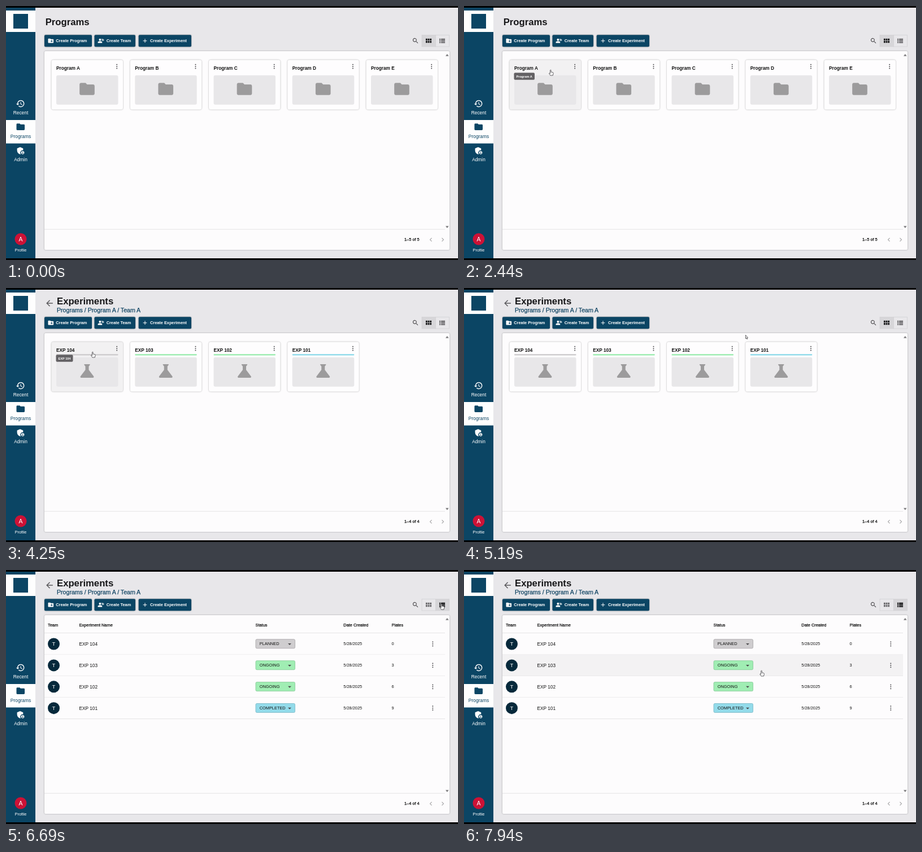
Recreate the animation shown at these times as an HTML page. Size 800x450 px, loop 8000 ms.

```html
<!DOCTYPE html>
<html lang="en">
<head>
<meta charset="utf-8">
<title>Programs</title>
<style>
  html, body { margin: 0; width: 100%; height: 100%; overflow: hidden; background: #000; }
  svg { display: block; width: 800px; height: 450px; }
  text { font: 8.25px "Liberation Sans", Arial, sans-serif; fill: #111; }
  .b { font-weight: 700; }
  .mid { stroke: currentColor; stroke-width: .25px; }
  .mid, .link { color: #111; }
  .title { font-size: 16.7px; font-weight: 700; fill: #171719; }
  .crumb { font-size: 10.6px; fill: #0d4261; color: #0d4261; }
  .btn { font-size: 7.35px; font-weight: 700; fill: #fff; }
  .nav { font-size: 8.4px; fill: #fff; text-anchor: middle; }
  .small { font-size: 7.4px; }
  .tip { font-size: 5.6px; font-weight: 700; fill: #fff; }
  .card { fill: #fefdfe; filter: drop-shadow(0 .8px .8px #0005); }
  .card.over { fill: #f2f1f2; }
  .row { fill: #fdfcfd; }
  .row.over { fill: #f3f2f3; }
  .line { stroke: #e4e3e5; stroke-width: 1; }
</style>
</head>
<body>
<svg id="stage" viewBox="0 0 800 450"></svg>
<script>
const NAVY = '#0b4564', GREY = '#9c9b9c', DARK = '#4d4c4f';
const icons = {
  folder: 'M10 4H4c-1.1 0-2 .9-2 2v12c0 1.1.9 2 2 2h16c1.1 0 2-.9 2-2V8c0-1.1-.9-2-2-2h-8l-2-2z',
  folderAdd: 'M20 6h-8l-2-2H4c-1.1 0-2 .9-2 2v12c0 1.1.9 2 2 2h16c1.1 0 2-.9 2-2V8c0-1.1-.9-2-2-2zm-1 8h-3v3h-2v-3h-3v-2h3V9h2v3h3v2z',
  personAdd: 'M9 4a4 4 0 1 1 0 8a4 4 0 1 1 0-8zM1 20v-3c0-2.5 5-4 8-4s8 1.500 8 4v3zM14 4a4 4 0 0 1 0 8c2-2 2-6 0-8zM19 8V5h2v3h3v2h-3v3h-2v-3h-3V8z',
  plus: 'M19 13h-6v6h-2v-6H5v-2h6V5h2v6h6z',
  history: 'M13 3c-4.970 0-9 4.030-9 9H1l4 4 4-4H6c0-3.870 3.130-7 7-7s7 3.130 7 7-3.130 7-7 7c-1.930 0-3.680-.8-4.940-2.060l-1.420 1.420A9 9 0 1 0 13 3zm-1 5v5l4.280 2.540.72-1.210-3.500-2.080V8z',
  shield: 'M17 11c.34 0 .67.04 1 .09V6.270L10.500 3 3 6.270v4.910c0 4.540 3.200 8.790 7.500 9.820.55-.13 1.080-.32 1.600-.55A6 6 0 0 1 17 11zM17 13a4 4 0 1 0 0 8a4 4 0 1 0 0-8zm0 1.400a1.100 1.100 0 1 1 0 2.200a1.100 1.100 0 1 1 0-2.200zm0 5.350c-.93 0-1.740-.46-2.240-1.170.05-.72 1.510-1.080 2.240-1.080s2.190.36 2.240 1.080c-.5.71-1.310 1.170-2.240 1.170z',
  groups: 'M12 12.750c1.630 0 3.070.39 4.240.9A3 3 0 0 1 18 16.400V18H6v-1.600a3 3 0 0 1 1.760-2.750c1.170-.5 2.610-.9 4.240-.9zM12 6a3 3 0 1 1 0 6a3 3 0 1 1 0-6zM4 9a2 2 0 1 1 0 4a2 2 0 1 1 0-4zM20 9a2 2 0 1 1 0 4a2 2 0 1 1 0-4zM5.100 14.100a7 7 0 0 0-3.900.5A2 2 0 0 0 0 16.400V18h4.500v-1.600c0-.8.2-1.600.6-2.300zM18.900 14.100a7 7 0 0 1 3.900.5A2 2 0 0 1 24 16.400V18h-4.500v-1.600c0-.8-.2-1.600-.6-2.300z',
  flask: 'M19.800 18.400L14 10.670V6.500l1.350-1.690c.26-.33.03-.81-.39-.81H9.040c-.42 0-.65.48-.39.81L10 6.500v4.170L4.200 18.400c-.49.66-.02 1.600.8 1.600h14c.82 0 1.290-.94.8-1.600z',
  search: 'M15.500 14h-.8l-.3-.3a6.500 6.500 0 1 0-.7.700l.3.300v.8l5 5 1.500-1.500zm-6 0a4.500 4.500 0 1 1 0-9a4.500 4.500 0 1 1 0 9z',
  back: 'M20 11H7.830l5.590-5.590L12 4l-8 8 8 8 1.410-1.410L7.830 13H20z',
  grid: 'M3 5h5v6H3zM9.500 5h5v6h-5zM16 5h5v6h-5zM3 12.500h5v6H3zM9.500 12.500h5v6h-5zM16 12.500h5v6h-5z',
  list: 'M3 5h4v4H3zM8.500 5H21v4H8.500zM3 10h4v4H3zM8.500 10H21v4H8.500zM3 15h4v4H3zM8.500 15H21v4H8.500z'
};

// Drawing helpers
const icon = (name, cx, cy, size, fill, id = '') =>
  `<path ${id && `id="${id}"`} d="${icons[name]}" fill="${fill}" fill-rule="evenodd" transform="translate(${cx - size / 2} ${cy - size / 2}) scale(${size / 24})"/>`;
const text = (x, y, s, cls = '') => `<text x="${x}" y="${y}" class="${cls}">${s}</text>`;
const rect = (x, y, w, h, fill, rx = 0, extra = '') =>
  `<rect x="${x}" y="${y}" width="${w}" height="${h}" fill="${fill}" rx="${rx}" ${extra}/>`;
const hline = (x1, x2, y) => `<path class="line" d="M${x1} ${y}H${x2}"/>`;
const dots = (x, y) => [-3.4, 0, 3.4].map(d => `<circle cx="${x}" cy="${y + d}" r="1" fill="${DARK}"/>`).join('');
const chevron = (x, dir) => `<path d="M${x - dir * 1.5} 411l${dir * 3} 3l${-dir * 3} 3" fill="none" stroke="#aaa9ab" stroke-width="1.1"/>`;

const PITCH = 139.25;
function card(name, i, symbol, size, strip) {
  const x = 80.5 + i * PITCH;
  return `<rect class="card" x="${x}" y="95.500" width="126.500" height="88" rx="3.500"/>`
    + text(x + 8.5, 113, name, 'b') + dots(x + 115.7, 107.2)
    + (strip ? rect(x + 8.5, 117, 109.5, 2.6, strip, 1) : '')
    + rect(x + 8.5, 122.7, 109.5, 52, '#e8e7e9', 3)
    + icon(symbol, x + 63, 147, size, GREY);
}
function tooltip(id, label, w) {
  return `<g id="${id}">${rect(88.5, 118.3, w, 12.4, '#636164', 2)}${text(92.5, 126.6, label, 'tip')}</g>`;
}
const header = (title, crumbs) => icon('back', 77, 27, 17.5, '#5a595c')
  + text(90, 29, title, 'title') + text(90, 43, crumbs, 'crumb mid');
const count = n => text(705, 416.3, `1–${n} of ${n}`, 'small mid');

function row(name, i, status, fill, edge, plates) {
  const y = 131 + 38 * i - i * .1;
  return `<rect class="row" x="68" y="${y - 18.8}" width="709" height="37.500"/>`
    + hline(68, 777, y + 19)
    + `<circle cx="84.500" cy="${y}" r="10.500" fill="#06293b"/>`
    + `<text x="84.500" y="${y + 3.4}" style="font-size:9.500px;fill:#fff;text-anchor:middle">T</text>`
    + text(129.6, y + 3, name)
    + rect(442, y - 8.2, 69.5, 16, fill, 2, `stroke="${edge}" stroke-width=".8"`)
    + text(448.7, y + 2.2, status, 'small')
    + `<path d="M499 ${y - 1}h6l-3 3z" fill="${DARK}"/>`
    + text(597.3, y + 2.2, '5/28/2025', 'small') + text(682.6, y + 2.2, plates, 'small')
    + dots(755.3, y);
}

const letters = ['A', 'B', 'C', 'D', 'E'];
const gray = '#cfcdcf', green = '#a0edb3', blue = '#93dbea';
const strips = [gray, green, green, blue];
const names = ['EXP 104', 'EXP 103', 'EXP 102', 'EXP 101'];
const path = 'Programs / Program A';

const scenes = [
  text(69.7, 34, 'Programs', 'title') + count(5)
    + letters.map((l, i) => card('Program ' + l, i, 'folder', 32)).join(''),
  header('Teams', path) + count(2)
    + ['Team A', 'Team B'].map((n, i) => card(n, i, 'groups', 31)).join(''),
  header('Experiments', path + ' / Team A') + count(4)
    + names.map((n, i) => card(n, i, 'flask', 36, strips[i])).join(''),
  header('Experiments', path + ' / Team A') + count(4)
    + [[74, 'Team'], [129.6, 'Experiment Name'], [441.5, 'Status'], [597.3, 'Date Created'], [682.6, 'Plates']]
      .map(([x, s]) => text(x, 99.8, s, 'small mid')).join('') + hline(68, 777, 111.6)
    + row(names[0], 0, 'PLANNED', gray, '#a5a3a5', 0) + row(names[1], 1, 'ONGOING', green, '#83c795', 3)
    + row(names[2], 2, 'ONGOING', green, '#83c795', 6) + row(names[3], 3, 'COMPLETED', blue, '#78b5c4', 9)
];

const button = (x, w, name, label, tx) =>
  rect(x, 51.3, w, 21, NAVY, 2, 'style="filter:drop-shadow(0 .8px .8px #0006)"')
  + icon(name, x + 11.3, 61.7, 11.5, '#fff') + text(tx, 64.2, label, 'btn');

stage.innerHTML =
  rect(0, 3, 800, 444, '#e8e7ea')
  + rect(0, 3, 52, 444, NAVY) + rect(0, 8, 52, 38, '#fefefe') + rect(13, 14, 26, 26, NAVY)
  + icon('history', 25.5, 173, 16.5, '#fff') + text(26, 192, 'Recent', 'nav')
  + rect(0, 202, 52, 41.5, '#fefefe') + icon('folder', 25.8, 214.2, 17.5, NAVY)
  + `<text x="26" y="234" class="nav" style="fill:${NAVY}">Programs</text>`
  + icon('shield', 26, 256.3, 17, '#fff') + text(26, 275.4, 'Admin', 'nav')
  + `<circle cx="26" cy="413" r="10.500" fill="#cc1236"/>`
  + `<text x="26" y="416.700" class="nav" style="font-size:10.500px">A</text>`
  + `<text x="26" y="435" class="nav" style="font-size:7.400px">Profile</text>`
  + button(68, 84, 'folderAdd', 'Create Program', 88.3)
  + button(156.5, 72.5, 'personAdd', 'Create Team', 177.7)
  + button(234.7, 93.3, 'plus', 'Create Experiment', 255)
  + icon('search', 724.8, 61.7, 13, DARK)
  + rect(736, 51.5, 24.5, 20.5, '#d7d6d9', 0, 'id="gridCell" stroke="#d2d1d4" stroke-width=".8"')
  + rect(760.5, 51.5, 24, 20.5, '#e8e7ea', 0, 'id="listCell" stroke="#d2d1d4" stroke-width=".8"')
  + icon('grid', 748, 61.7, 13.5, '#171719', 'gridIcon') + icon('list', 772, 61.7, 13.5, '#6b6a6d', 'listIcon')
  + rect(68, 80, 717, 352, '#fdfcfd', 2, 'style="filter:drop-shadow(0 .8px 1px #0005)"')
  + hline(68, 777, 395.7)
  + `<path d="M778 88.800h5.600l-2.800-3.800zM778 389.700h5.600l-2.800 3.800z" fill="#7c7b7d"/>`
  + chevron(752, -1) + chevron(773, 1)
  + scenes.map(s => `<g class="scene">${s}</g>`).join('')
  + tooltip('tip0', 'Program A', 36.5) + tooltip('tip1', 'Team A', 27.5) + tooltip('tip2', 'EXP 104', 30)
  + `<g id="cursor" stroke="#333236" stroke-width=".75" stroke-linejoin="round" fill="#fff">
      <path id="hand" d="M-.8.7Q0-.4.8.7V4L4 4.600Q5 5 4.800 6.200L4 10H-.5L-2.700 6.800Q-2.800 5.600-1.700 6L-.8 6.700Z"/>
      <path id="arrow" d="M0 0V6.200L1.400 5L2.300 7.200L3.300 6.800L2.400 4.700H4.200Z"/></g>`;

const $ = id => document.getElementById(id);
const show = (el, on) => { el.style.display = on ? '' : 'none'; };
const groups = [...document.querySelectorAll('.scene')];
const hoverables = groups.map(g => [...g.querySelectorAll('.card, .row')]);

const LOOP = 8000;
const switches = [2750, 3620, 6600];
const tips = [[2420, 2750], [2950, 3620], [3850, 4480]];
// time, x, y of the pointer's tip
const track = [
  [700, 744, 425], [1320, 517.5, 123], [1640, 517.5, 123], [2350, 153.3, 113],
  [4420, 153.3, 113], [5850, 771, 60], [6700, 771, 60], [7060, 735, 77.5],
  [7180, 735, 77.5], [7850, 526.5, 178]
];

function pointer(t) {
  const i = track.findIndex(k => k[0] > t);
  if (i < 0) return track[track.length - 1].slice(1);
  if (i === 0) return null;
  const [t0, x0, y0] = track[i - 1], [t1, x1, y1] = track[i];
  const p = (t - t0) / (t1 - t0), e = p * p * (3 - 2 * p);
  return [x0 + (x1 - x0) * e, y0 + (y1 - y0) * e];
}

function inside(el, x, y) {
  const [l, tp, w, h] = ['x', 'y', 'width', 'height'].map(a => +el.getAttribute(a));
  return x >= l && x < l + w && y >= tp && y < tp + h;
}

function draw(t) {
  const scene = switches.filter(s => t >= s).length;
  groups.forEach((g, i) => show(g, i === scene));
  tips.forEach(([from, to], i) => show($('tip' + i), t >= from && t < to));

  const isList = scene === 3;
  $('gridCell').setAttribute('fill', isList ? '#e8e7ea' : '#d7d6d9');
  $('listCell').setAttribute('fill', isList ? '#d7d6d9' : '#e8e7ea');
  $('gridIcon').setAttribute('fill', isList ? '#6b6a6d' : '#171719');
  $('listIcon').setAttribute('fill', isList ? '#171719' : '#6b6a6d');

  const at = pointer(t);
  show($('cursor'), at);
  let hot = false;
  hoverables[scene].forEach(el => {
    const over = !!at && inside(el, ...at);
    el.classList.toggle('over', over);
    hot = hot || over;
  });
  if (!at) return;
  hot = hot || inside($('gridCell'), ...at) || inside($('listCell'), ...at);
  show($('hand'), hot);
  show($('arrow'), !hot);
  $('cursor').setAttribute('transform', `translate(${at[0]} ${at[1]})`);
}

function tick() {
  draw(performance.now() % LOOP);
  requestAnimationFrame(tick);
}
tick();
</script>
</body>
</html>
```
